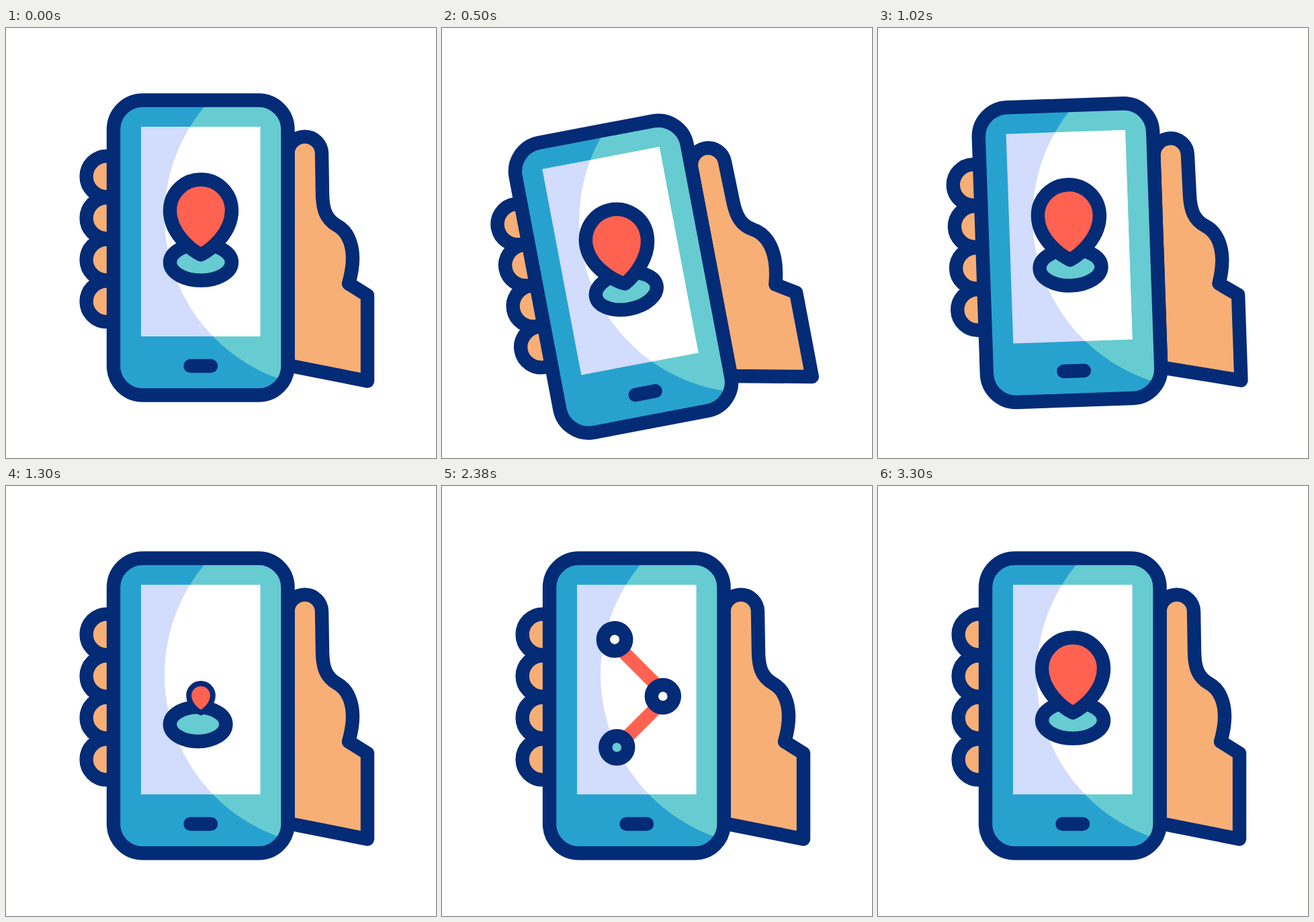
These frames come from a looping animation (640 px wide and 640 px high, 3.5 s). An HTML page:

```html
<!DOCTYPE html>
<html>
<head>
<meta charset="utf-8">
<style>
  html, body { margin: 0; width: 100%; height: 100%; overflow: hidden; background: #fff; }
  svg { display: block; width: 100vw; height: 100vh; }
  .ink { stroke: #042b76; stroke-width: 20.4; stroke-linejoin: round; stroke-linecap: round; }
  .skin { fill: #f7af75; }
  .route { stroke: #ff6250; stroke-width: 20; stroke-linecap: round; }
</style>
</head>
<body>
<svg viewBox="0 0 640 640">
  <defs>
    <clipPath id="shine"><circle cx="492" cy="281" r="256"/></clipPath>
  </defs>
  <g id="scene">
    <g class="ink skin">
      <circle cx="150" cy="221" r="30.4"/>
      <circle cx="150" cy="283" r="30.4"/>
      <circle cx="150" cy="345" r="30.4"/>
      <circle cx="150" cy="407" r="30.4"/>
      <path d="M419.5 502V187A25.2 25.2 0 0 1 470 187L471 248C471.500 270 476 284 492 293.500C510 303 516 324 516 343C516 359 513 370 510 380.500L538 398V525.500Z"/>
    </g>
    <rect x="160" y="107.500" width="259.500" height="439" rx="43.500" fill="#27a2ce"/>
    <rect x="201" y="147" width="177.500" height="312" fill="#d2dcfd"/>
    <g clip-path="url(#shine)">
      <path fill="#66ccd1" fill-rule="evenodd" d="M160 107.500H376A43.500 43.500 0 0 1 419.500 151V503A43.500 43.500 0 0 1 376 546.500H160ZM201 147V459H378.500V147Z"/>
      <rect x="201" y="147" width="177.500" height="312" fill="#fff"/>
    </g>
    <rect class="ink" x="160" y="107.500" width="259.500" height="439" rx="43.500" fill="none"/>
    <path class="ink" d="M274.500 503H305"/>
    <line id="line1" class="route"/>
    <line id="line2" class="route"/>
    <ellipse id="base" class="ink" fill="#66ccd1"/>
    <circle id="stop1" class="ink" fill="#fff"/>
    <circle id="stop2" class="ink" fill="#fff"/>
    <path id="drop" class="ink" fill="#ff6250" d="M290 337.500C275 330 244 305 244 271.500A46 46 0 0 1 336 271.500C336 305 305 330 290 337.500Z"/>
  </g>
</svg>
<script>
const LOOP = 3500, STEP = 20, REST = 2280;
const swing = [[200, 0], [580, -12], [825, 6], [1075, -3], [1280, 0]];

const clamp = u => Math.max(0, Math.min(1, u));
const mix = (a, b, k) => a + (b - a) * k;
const smooth = u => (1 - Math.cos(Math.PI * u)) / 2;
const back = u => 1 + 3.6 * (u - 1) ** 3 + 2.6 * (u - 1) ** 2;

function set(id, attrs) {
  const el = document.getElementById(id);
  for (const key in attrs) el.setAttribute(key, attrs[key]);
}

// Rises from a to b, then falls from c to d.
const phase = (t, a, b, c, d) =>
  clamp(t < REST ? (t - a) / (b - a) : (d - t) / (d - c));

function tilt(t) {
  let angle = 0;
  for (let i = 1; i < swing.length; i++) {
    const [t0, from] = swing[i - 1], [t1, to] = swing[i];
    if (t >= t0) angle = mix(from, to, smooth(clamp((t - t0) / (t1 - t0))));
  }
  return angle;
}

function route(id, k, x1, y1, x2, y2) {
  set(id, { x1, y1, x2: mix(x1, x2, k), y2: mix(y1, y2, k), visibility: k > 0 ? "visible" : "hidden" });
}

function stop(id, u, x, y, shift) {
  const k = back(u), rest = 1 - clamp(k);
  set(id, {
    cx: x + shift * rest, cy: y - 17 * rest, r: Math.max(0, 17 * k),
    opacity: clamp(u * 2.8), visibility: u > 0 ? "visible" : "hidden"
  });
}

function draw(t) {
  set("scene", { transform: `rotate(${tilt(t)} 510 454)` });

  const size = 1 - smooth(phase(t, 1140, 1420, 2880, 3300));
  set("drop", {
    transform: `translate(290 337.5) scale(${size}) translate(-290 -337.5)`,
    visibility: size > 0 ? "visible" : "hidden"
  });

  const k = smooth(phase(t, 1200, 1600, 2560, 2980));
  set("base", { cx: mix(290, 260.2, k), cy: mix(348.8, 389, k), rx: mix(46, 17, k), ry: mix(27, 17, k) });

  route("line1", smooth(phase(t, 1600, 1840, 2560, 2760)), 260, 389, 331, 318);
  route("line2", smooth(phase(t, 1820, 2040, 2420, 2620)), 331, 308, 257, 234);
  stop("stop1", phase(t, 1660, 1940, 2500, 2780), 328.8, 313, 17);
  stop("stop2", phase(t, 1880, 2180, 2360, 2640), 257, 228.400, -17);
}

function tick() {
  draw(Math.floor((performance.now() % LOOP) / STEP) * STEP);
  requestAnimationFrame(tick);
}
tick();
</script>
</body>
</html>
```
